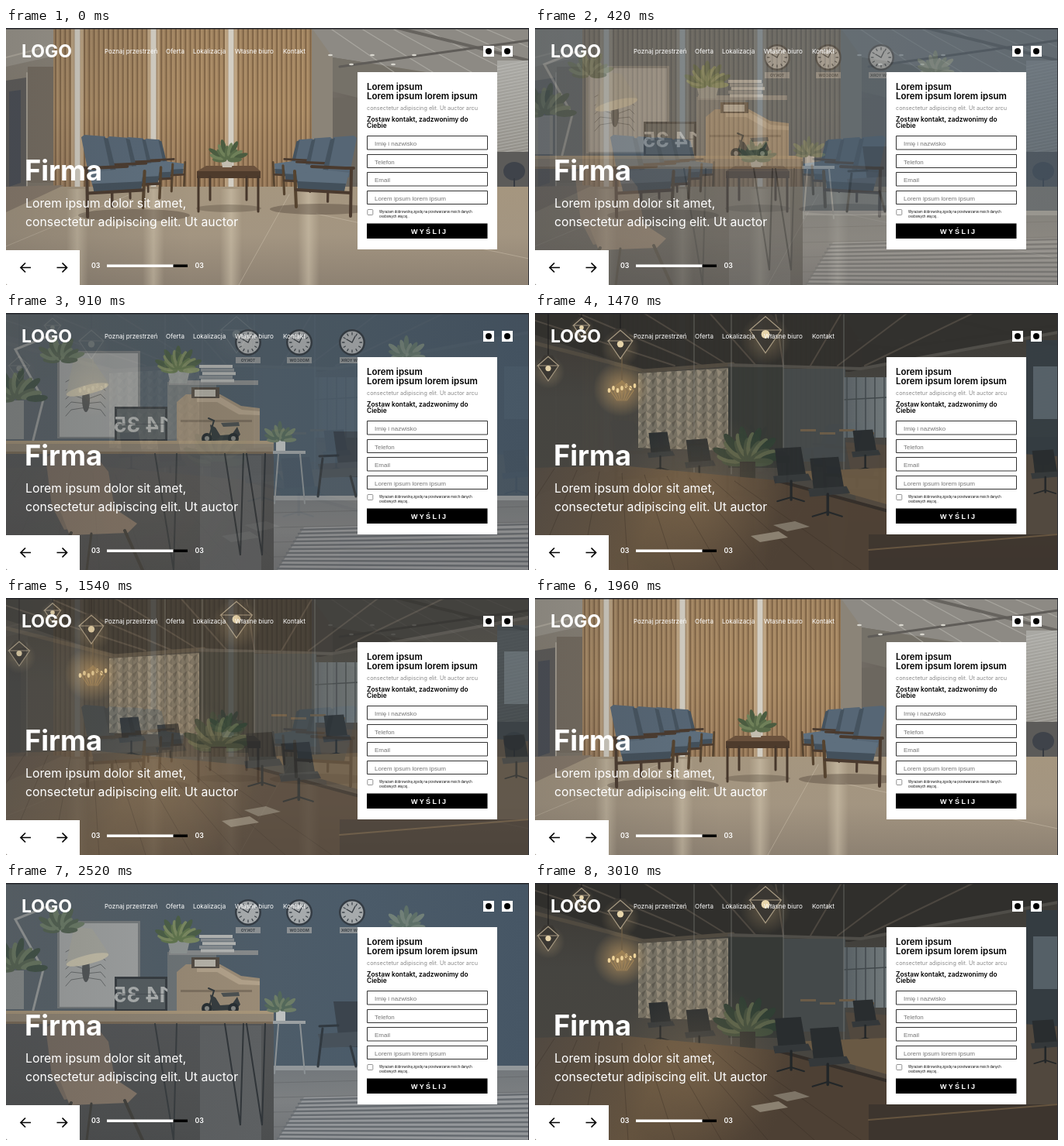
Recreate the animation shown at these times as an HTML page with a canvas. Size 674 px wide and 332 px high, loop 3080 ms.

```html
<!DOCTYPE html>
<html lang="pl">
<head>
<meta charset="utf-8">
<title>Firma</title>
<style>
html, body { margin: 0; width: 100%; height: 100%; overflow: hidden; background: #222; }
canvas, svg { position: absolute; left: 0; top: 0; width: 674px; height: 332px; display: block; }
text { font-family: Inter, "Open Sans", sans-serif; fill: #fff; white-space: pre; }
.b { font-weight: 700; }
.s { font-weight: 600; }
.k text { fill: #000; }
.k .in { font: 8px "Liberation Sans", Arial, sans-serif; fill: #757575; }
.k .gray { fill: #8a8a8a; }
.box { fill: #fff; stroke: #333; stroke-width: 1; }
.arrow { fill: none; stroke: #000; stroke-width: 1.7; }
</style>
</head>
<body>
<canvas id="stage" width="674" height="332"></canvas>
<svg viewBox="0 0 674 332">
  <text class="b" x="20" y="38.4" font-size="23">LOGO</text>
  <g font-size="8.05">
    <text x="127" y="33.3">Poznaj przestrzeń</text>
    <text x="206" y="33.3">Oferta</text>
    <text x="241" y="33.3">Lokalizacja</text>
    <text x="295" y="33.3">Własne biuro</text>
    <text x="357" y="33.3">Kontakt</text>
  </g>
  <path fill="#fff" d="M615 23h14v14h-14zM639 23h14v14h-14z"/>
  <circle cx="622" cy="30" r="4"/>
  <circle cx="646" cy="30" r="4"/>

  <text class="b" x="24" y="197" font-size="36.2">Firma</text>
  <g font-size="15.8">
    <text x="25" y="232">Lorem ipsum dolor sit amet,</text>
    <text x="25" y="255.5">consectetur adipiscing elit. Ut auctor</text>
  </g>

  <path fill="#fff" d="M0 287h95v45H2q-2 0-2-2z"/>
  <path class="arrow" d="M32 309.5H19M25 303.5l-6 6 6 6M65.5 309.5h13M72.500 303.5l6 6-6 6"/>
  <g class="s" font-size="8.8">
    <text x="110" y="310.3">03</text>
    <text x="243.500" y="310.3">03</text>
  </g>
  <path fill="#fff" d="M130 305.500h86v3.500h-86z"/>
  <path d="M215.500 305.500h18.500v3.500h-18.500z"/>

  <path fill="#fff" d="M453 57h180v229H453z"/>
  <g class="k">
    <g class="s" font-size="11.5">
      <text x="465" y="80">Lorem ipsum</text>
      <text x="465" y="91.500">Lorem ipsum lorem ipsum</text>
    </g>
    <text class="gray" x="465" y="105.600" font-size="7.25">consectetur adipiscing elit. Ut auctor arcu</text>
    <g class="s" font-size="8.4">
      <text x="465" y="121">Zostaw kontakt, zadzwonimy do</text>
      <text x="465" y="128.600">Ciebie</text>
    </g>
    <path class="box" d="M465.500 139.500h155v17.500h-155zM465.500 163.500h155v17h-155zM465.500 186.500h155v17.500h-155zM465.500 210.500h155v17h-155z"/>
    <text class="in" x="475" y="152.300">Imię i nazwisko</text>
    <text class="in" x="475" y="175.800">Telefon</text>
    <text class="in" x="475" y="199.200">Email</text>
    <text class="in" x="475" y="222.700">Lorem ipsum lorem ipsum</text>
    <rect x="465.800" y="234.500" width="7" height="7" rx="1" fill="#fff" stroke="#777" stroke-width=".8"/>
    <g font-size="4.15">
      <text x="481" y="238.800">Wyrażam dobrowolną zgodę na przetwarzanie moich danych</text>
      <text x="481" y="244.800">osobowych więcej..</text>
    </g>
    <path d="M465 252.500h155.500v19.500H465z"/>
  </g>
  <text x="522" y="265.700" style="font:bold 9px 'Liberation Sans',Arial,sans-serif;letter-spacing:2.3px">WYŚLIJ</text>
</svg>
<script>
const W = 674, H = 332, LOOP = 3080, STEP = 70, PERIOD = 607, FIRST = 93;
const stage = document.getElementById('stage').getContext('2d');
let g;

function paint(draw) {
  const c = document.createElement('canvas');
  c.width = W; c.height = H;
  g = c.getContext('2d');
  g.lineCap = 'round';
  draw();
  rect('#25262b', 0, 0, W, 1.5);
  rect('#33343a', W - 1, 0, 1, H);
  return c;
}
function rect(col, x, y, w, h) { g.fillStyle = col; g.fillRect(x, y, w, h); }
function trace(p) {
  g.beginPath();
  for (let i = 0; i < p.length; i += 2) g.lineTo(p[i], p[i + 1]);
}
function poly(col, ...p) { trace(p); g.fillStyle = col; g.fill(); }
function line(col, w, ...p) { trace(p); g.strokeStyle = col; g.lineWidth = w; g.stroke(); }
function oval(col, x, y, rx, ry = rx, turn = 0) {
  g.beginPath(); g.ellipse(x, y, rx, ry, turn, 0, 7); g.fillStyle = col; g.fill();
}
function fade(x0, y0, x1, y1, ...cols) {
  const f = g.createLinearGradient(x0, y0, x1, y1);
  cols.forEach((c, i) => f.addColorStop(i / (cols.length - 1), c));
  return f;
}
function glow(rgb, a, x, y, r) {
  const f = g.createRadialGradient(x, y, 0, x, y, r);
  f.addColorStop(0, `rgba(${rgb},${a})`);
  f.addColorStop(1, `rgba(${rgb},0)`);
  rect(f, x - r, y - r, 2 * r, 2 * r);
}
function leaves(cols, x, y, r, n) {
  for (let i = 0; i < n; i++) {
    const a = Math.PI * (1.02 + .96 * i / (n - 1)), d = r * (.45 + .2 * (i % 3));
    oval(cols[i % cols.length], x + Math.cos(a) * d, y + Math.sin(a) * d, r * .42, r * .14, a);
  }
}
function mirrored(txt, x, y, size, col) {
  g.save();
  g.translate(x, y); g.scale(-1, 1);
  g.font = `bold ${size}px Inter, sans-serif`;
  g.textAlign = 'center'; g.fillStyle = col;
  g.fillText(txt, 0, 0);
  g.restore();
}

function armchair(x, y, s, dir) {
  g.save();
  g.translate(x, y); g.scale(s * dir, s);
  poly('#566675', 0, 3, 4, 0, 30, 2, 40, 48, 10, 54);
  poly('#45535f', 28, 3, 34, 5, 44, 46, 38, 50);
  poly('#5e6f7e', 10, 48, 42, 44, 78, 49, 76, 61, 14, 64);
  poly('#43505b', 14, 62, 77, 59, 76, 69, 16, 72);
  line('#4a3a2e', 4, 4, 42, 14, 42, 58, 40);
  line('#4a3a2e', 4, 7, 44, 8, 104);
  line('#55432f', 4, 80, 46, 78, 92);
  line('#4a3a2e', 4, 8, 74, 78, 70);
  g.restore();
}

function lobby() {
  rect(fade(0, 0, 0, 210, '#8b857b', '#857d70', '#7b7367'), 0, 0, W, 215);
  poly('#9a958b', 0, 0, 75, 0, 62, 36, 0, 50);
  poly('#5c5a58', 0, 68, 26, 64, 26, 205, 0, 215);
  poly('#474b53', 4, 82, 19, 80, 19, 200, 4, 205);
  rect('#756c60', 28, 50, 34, 150);
  line('#a69f92', 2, 27, 58, 27, 205);
  line('#b4aea1', 2, 0, 38, 62, 22);

  rect(fade(0, 0, 0, 208, '#a08360', '#a98a64', '#97795a'), 61, 0, 333, 208);
  for (let x = 63; x < 394; x += 6.2) {
    rect('rgba(92,68,44,.5)', x, 0, 1.8, 208);
    rect('rgba(205,175,132,.25)', x + 2.5, 0, 1.5, 208);
  }
  for (const x of [92, 190, 290]) {
    rect('rgba(226,210,180,.35)', x - 8, 0, 16, 208);
    rect('#d3cec3', x - 3.5, 0, 7, 208);
  }

  // ceiling and glass on the right
  rect(fade(394, 0, 455, 0, '#77716a', '#68635b'), 394, 0, 62, 208);
  rect('#8b8478', 394, 0, 27, 205);
  poly('#8d8a84', 394, 0, W, 0, W, 62, 560, 60, 421, 38);
  poly('#757168', 421, 38, 560, 60, 453, 90, 421, 82);
  for (let i = 0; i < 6; i++) line('rgba(190,188,181,.55)', 1.3, 420 + i * 40, 2, 500 + i * 50, 57);
  line('#67645f', 4, 505, 0, W, 42);
  line('#5f5c58', 3, 430, 50, W, 16);
  for (let i = 0; i < 5; i++) oval('#d8d6ce', 418 + i * 27, 35 + i % 2 * 12, 3, 1.3);
  rect(fade(0, 50, 0, 180, '#a9a8a3', '#918e87'), 633, 42, 41, 138);
  for (let i = 0; i < 30; i++) line('rgba(210,209,204,.5)', .8, 633, 50 + i * 4, W, 42 + i * 4);
  rect('#5c5b59', 633, 160, 41, 52);
  oval('#3f434a', 655, 185, 14, 12);
  line('#363a40', 2, 655, 195, 655, 213, 643, 216);
  rect('#6c675f', 421, 90, 32, 110);

  rect(fade(0, 203, 0, H, '#a5967f', '#a39581', '#8d8172'), 0, 205, W, 127);
  poly('#87796a', 0, 205, 75, 203, 0, 238);
  for (const x of [92, 190, 290, 390]) {
    rect(fade(x - 14, 0, x + 14, 0, 'rgba(216,204,180,0)', 'rgba(216,204,180,.5)', 'rgba(216,204,180,0)'), x - 14, 208, 28, 124);
  }
  line('rgba(214,203,183,.4)', 1, 0, 282, 160, 215);
  line('rgba(214,203,183,.4)', 1, 300, H, 365, 215);
  line('rgba(214,203,183,.4)', 1, 674, 298, 400, 240);
  oval('rgba(72,60,48,.38)', 165, 242, 72, 8);
  oval('rgba(72,60,48,.38)', 405, 234, 65, 7);
  oval('rgba(72,60,48,.3)', 287, 233, 42, 5);

  armchair(178, 143, .66, 1);
  armchair(154, 141, .76, 1);
  armchair(130, 140, .87, 1);
  armchair(97, 138, 1.02, 1);
  armchair(397, 143, .66, -1);
  armchair(421, 141, .8, -1);
  armchair(452, 139, 1, -1);

  poly('#6a513c', 246, 185, 258, 178, 320, 178, 328, 185);
  rect('#4e3b2c', 246, 185, 82, 9);
  for (const [x, y] of [[248, 237], [263, 222], [310, 222], [325, 237]]) line('#46372b', 3, x, 192, x, y);
  poly('#c3bdb0', 277, 170, 293, 170, 291, 180, 279, 180);
  leaves(['#596b49', '#6f8059', '#4b5c40'], 285, 171, 22, 13);
  rect(fade(0, 0, 240, 0, 'rgba(65,65,65,.2)', 'rgba(65,65,65,0)'), 0, 0, 240, H);
}

function clock(x, city) {
  oval('#343c44', x, 38, 17);
  oval('#a6aaac', x, 38, 14.5);
  for (let i = 0; i < 12; i++) {
    const a = i * Math.PI / 6, c = Math.cos(a), s = Math.sin(a);
    line('#3f464c', 1.3, x + c * 10, 38 + s * 10, x + c * 12.5, 38 + s * 12.5);
  }
  line('#343a40', 1.3, x - 7, 34, x, 38, x + 4, 30);
  rect('#8b9093', x - 16, 57, 32, 8);
  mirrored(city, x, 63, 5.2, '#3d444a');
}

function desk() {
  rect(fade(0, 0, W, 0, '#5a646b', '#4f5d68', '#4b5b69', '#465665'), 0, 0, W, 250);
  rect(fade(0, 232, 0, H, '#71767a', '#7d8082', '#707376'), 335, 242, 339, 90);
  rect('#92979a', 335, 236, 339, 6);
  for (let i = 0; i < 4; i++) line('rgba(85,88,91,.4)', 1, 345, 258 + i * 19, W, 250 + i * 20);
  poly('#94979a', 384, 277, W, 271, W, H, 350, H);
  for (let i = 0; i < 11; i++) line('#666b70', 2.5, 380 - i * 3, 280 + i * 5, W, 273 + i * 6);
  clock(312, 'TOKYO');
  clock(378, 'MOSCOW');
  clock(446, 'NEW YORK');
  leaves(['#718078', '#5e7068'], 516, 58, 23, 11);

  // poster and lamp
  rect('#777c7e', 66, 49, 107, 113);
  rect('#a1a4a4', 69, 52, 101, 108);
  for (let i = -2; i < 3; i++) {
    line('#676b6c', 1, 103, 112 + i * 5, 84, 105 + i * 10, 77, 111 + i * 11);
    line('#676b6c', 1, 103, 112 + i * 5, 122, 105 + i * 10, 128, 111 + i * 11);
  }
  oval('#515557', 103, 112, 5, 16);
  oval('#5e6264', 103, 94, 4, 5);
  line('#979b9b', 3, 35, 164, 48, 112, 12, 47, 54, 30, 91, 61);
  poly('#a6a79f', 88, 57, 111, 59, 133, 92, 77, 106);
  oval('#c8c2ac', 105, 99, 28, 6, -.24);
  rect('#878c8c', 0, 113, 23, 50);
  leaves(['#556452', '#687861', '#3f5146'], 12, 112, 33, 15);
  leaves(['#526252', '#6b7c67'], 70, 62, 26, 13);

  // organiser with books and plant
  rect('#6d7477', 208, 89, 63, 76);
  rect('#86898a', 210, 87, 115, 6);
  poly('#9a8b76', 232, 105, 276, 105, 303, 120, 327, 123, 327, 165, 220, 165, 220, 115);
  poly('#b1a18a', 246, 109, 277, 109, 304, 125, 327, 127, 327, 132, 300, 131, 272, 115, 246, 115);
  rect('#7d705f', 225, 138, 92, 3);
  for (let i = 0; i < 5; i++) rect(i % 2 ? '#878d91' : '#b2b4b2', 249 + i % 3 * 2, 67 + i * 4.6, 43, 4);
  poly('#8f9594', 208, 74, 237, 74, 233, 91, 212, 91);
  leaves(['#61764e', '#7b8a61', '#4b5f47'], 222, 75, 26, 17);
  rect('#524b43', 239, 96, 36, 14);
  rect('#b6b3a9', 243, 99, 27, 9);

  rect('#353b40', 140, 121, 68, 46);
  rect('#555d61', 143, 124, 62, 39);
  mirrored('14 35', 174, 154, 27, '#afb3b3');
  rect('rgba(60,67,71,.55)', 143, 143, 62, 1);
  poly('#8d8e8b', 139, 166, 210, 166, 221, 171, 144, 171);

  // scooter
  line('#30373a', 2, 262, 159, 268, 139, 261, 136);
  poly('#353c3f', 263, 144, 270, 148, 276, 158, 291, 157, 298, 147, 302, 157, 296, 164, 266, 165);
  poly('#4b5051', 277, 142, 300, 141, 301, 146, 280, 147);
  for (const x of [259, 293]) { oval('#272e32', x, 162, 7); oval('#858784', x, 162, 3); }

  rect('#908574', 0, 166, 345, 16);
  rect('#a79579', 0, 165, 345, 4);
  rect('#796a57', 0, 179, 345, 3);
  rect(fade(0, 182, 0, H, '#535557', '#505253', '#4c4e4f'), 0, 182, 345, 150);
  rect('#5d6062', 250, 184, 79, 148);
  for (const x of [302, 330]) line('#303539', 2, x - 20, 182, x, 313, x + 4, 182);
  line('#373c3f', 2, 192, 182, 216, H, 220, 182);

  // desk chair
  poly('#766b61', 51, 187, 67, 177, 115, 184, 132, 205, 143, 270, 75, 280, 59, 249);
  poly('#857769', 70, 256, 139, 252, 169, 272, 157, 284, 82, 287);
  line('#41403c', 4, 84, 284, 58, H);
  line('#41403c', 4, 153, 281, 176, H);
  line('#41403c', 3, 110, 285, 104, H);

  // side table and armchair
  rect('#9ba0a2', 344, 178, 42, 4);
  line('#8c9295', 2, 351, 182, 346, 246);
  line('#8c9295', 2, 379, 182, 385, 246);
  rect('#bdc0bf', 348, 164, 12, 14);
  leaves(['#6d7d67', '#53685a'], 353, 165, 20, 11);
  poly('#3b444d', 422, 153, 453, 153, 453, 212, 430, 211);
  poly('#47515a', 402, 195, 453, 192, 453, 211, 407, 213);
  line('#313940', 3, 404, 185, 428, 184);
  line('#313940', 3, 408, 188, 402, 237);
  line('#313940', 3, 444, 211, 451, 237);
  rect(fade(0, 0, 340, 0, 'rgba(60,60,60,.2)', 'rgba(60,60,60,0)'), 0, 0, 340, H);
}

function pendant(x, y, s) {
  glow('255,215,150', .25, x, y + 9 * s, 24 * s);
  line('#191918', 1, x, 0, x, y - 15 * s);
  poly('#3a3732', x - 6 * s, y - 15 * s, x + 6 * s, y - 15 * s, x + 16 * s, y, x, y + 22 * s, x - 16 * s, y);
  line('#a79a82', 1.2, x - 15 * s, y, x, y + 22 * s, x + 15 * s, y, x - 15 * s, y, x, y - 13 * s, x + 15 * s, y);
  oval('#e8d6ac', x, y + 4 * s, 4 * s);
}
function seat(x, y, s) {
  poly('#292d2f', x - 18 * s, y, x + 14 * s, y - 2 * s, x + 20 * s, y + 32 * s, x - 14 * s, y + 34 * s);
  poly('#34383a', x - 20 * s, y + 34 * s, x + 23 * s, y + 31 * s, x + 27 * s, y + 39 * s, x - 18 * s, y + 43 * s);
  line('#222628', 3 * s, x + 2 * s, y + 40 * s, x + 2 * s, y + 63 * s);
  line('#222628', 2 * s, x - 15 * s, y + 65 * s, x + 2 * s, y + 60 * s, x + 18 * s, y + 65 * s);
}

function meeting() {
  rect(fade(0, 0, 0, H, '#3b3833', '#454440', '#474540', '#484139'), 0, 0, W, H);
  poly('#302f2c', 0, 0, W, 0, W, 25, 405, 76, 250, 66, 133, 73, 0, 28);
  for (let i = 0; i < 8; i++) line('rgba(96,88,77,.6)', 2, i * 85 - 30, 0, 180 + i * 35, 68);
  line('#504a40', 5, 0, 39, 140, 75, 255, 66);
  line('#4f4d48', 4, 250, 67, 420, 72, W, 25);

  poly('#757063', 133, 78, 249, 71, 249, 178, 133, 174);
  g.save();
  trace([133, 78, 249, 71, 249, 178, 133, 174]); g.clip();
  for (let y = 72; y < 180; y += 11) for (let x = 130; x < 252; x += 13) {
    poly('#928978', x, y, x + 7, y + 4, x + 2, y + 11);
    poly('#5e5a50', x + 7, y + 4, x + 13, y, x + 9, y + 10);
  }
  g.restore();
  rect('#363936', 249, 70, 71, 130);
  rect('#44494a', 320, 72, 80, 120);
  rect(fade(398, 0, 453, 0, '#586064', '#727a7c'), 398, 83, 56, 78);
  for (let x = 402; x < 454; x += 12) line('#42494c', 1.5, x, 83, x, 161);
  line('#42494c', 1.5, 398, 112, 453, 109);
  rect('#343c41', 633, 35, 41, 171);
  rect('#556067', 642, 69, 32, 68);
  poly('#51483e', 400, 167, W, 185, W, H, 430, H);

  for (const x of [205, 253, 320, 398]) line('rgba(142,145,139,.55)', 1, x, 0, x, 208);
  leaves(['#424e3d', '#586149', '#303f34'], 274, 194, 38, 19);
  rect('#363632', 264, 192, 20, 26);
  for (let i = 0; i < 4; i++) rect('#6b5c48', 342 + i * 25, 150 + i % 2 * 4, 20, 3);
  seat(160, 155, .75);
  seat(210, 164, .85);
  seat(424, 152, .8);

  // long table
  poly(fade(0, 200, 300, H, '#514941', '#64533f', '#4d4034'), 0, 200, 110, 197, 310, 216, 470, 260, 470, H, 0, H);
  poly('#695944', 330, 205, 453, 200, 453, 247, 389, 229);
  glow('178,145,102', .25, 210, 235, 110);
  for (let i = 0; i < 9; i++) line('rgba(45,36,28,.3)', 1, 25 + i * 29, 201 + i * 2, i * 60 - 60, H);
  line('#332d28', 4, 310, 216, 470, 260);
  poly('#8b8171', 278, 288, 314, 282, 326, 290, 290, 296);
  poly('#7e7567', 307, 274, 335, 269, 354, 276, 325, 282);
  seat(328, 175, 1.05);
  seat(375, 188, 1.15);
  rect('#3d352e', 430, 286, 244, 46);
  line('#65543f', 2, 430, 306, W, 286);
  seat(656, 178, .85);

  // chandelier
  glow('255,199,118', .5, 111, 98, 36);
  line('#6b5b43', 1.2, 112, 42, 112, 86);
  for (let i = -3; i < 4; i++) {
    line('#a18457', 1.2, 112, 88, 112 + i * 5, 103 - Math.abs(i), 112 + i * 2, 113);
    oval('#f0d59b', 112 + i * 5.5, 97 - i % 2 * 3, 1.8, 3);
  }
  pendant(17, 68, .9);
  pendant(110, 36, 1.05);
  pendant(297, 22, 1.35);
  pendant(60, 16, .7);
}

const slides = [lobby, desk, meeting].map(paint);

function frame(now) {
  const t = Math.floor(now % LOOP / STEP) * STEP;
  const u = (t - FIRST) / PERIOD + 3, i = Math.floor(u);
  const p = Math.min(1, Math.max(0, (u - i - .22) / .56));
  stage.globalAlpha = 1;
  stage.drawImage(slides[i % 3], 0, 0);
  stage.globalAlpha = p * p * (3 - 2 * p);
  stage.drawImage(slides[(i + 1) % 3], 0, 0);
  requestAnimationFrame(frame);
}
frame(0);
</script>
</body>
</html>
```
